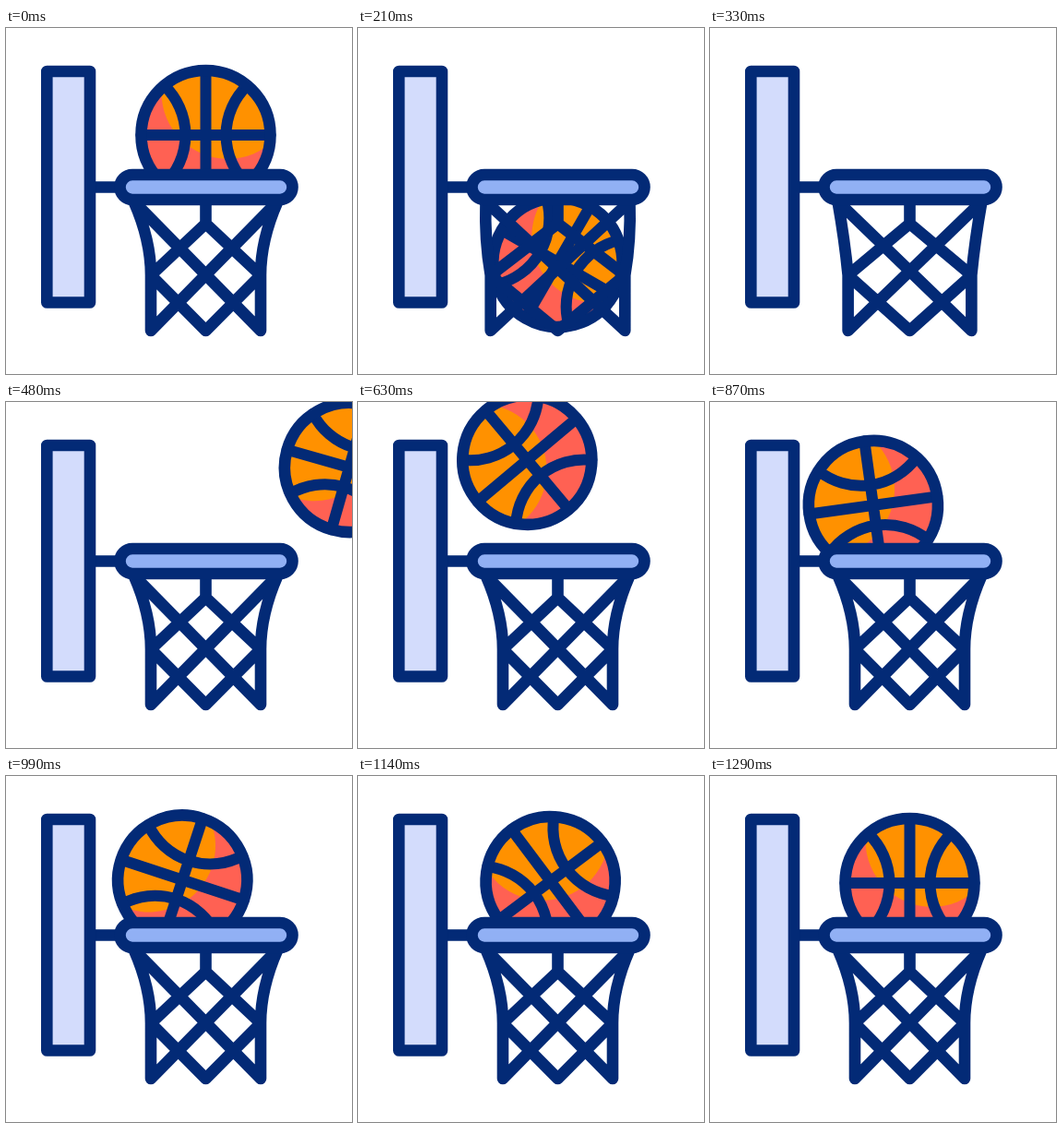
Recreate the animation shown at these times as an HTML page. Size 375 by 375 pixels, loop 1.5 s.

```html
<!DOCTYPE html>
<html lang="en">
<head>
<meta charset="utf-8">
<title>Basketball hoop</title>
<style>
  html, body { margin: 0; width: 100%; height: 100%; overflow: hidden; background: #fff; }
  svg { display: block; width: 100vw; height: 100vh; }
  .line { fill: none; stroke: #032a76; stroke-width: 12.6; stroke-linecap: round; stroke-linejoin: round; }
</style>
</head>
<body>
<svg viewBox="0 0 375 375">
  <defs><clipPath id="disc"><circle r="71"/></clipPath></defs>
  <g class="line">
    <path d="M95 172.500H122"/>
    <rect x="44.300" y="47" width="46.700" height="250.500" style="fill:#d3dcfc"/>
  </g>
  <g id="ball">
    <circle r="71" fill="#ff6153"/>
    <circle cx="24" cy="-46" r="72" fill="#ff9100" clip-path="url(#disc)"/>
    <g class="line">
      <path d="M0-70V70M-70 0H70M-45-53.600A74 74 0 0 1-45 53.600M45-53.600A74 74 0 0 0 45 53.600" stroke-width="12"/>
      <circle r="70"/>
    </g>
  </g>
  <path id="net" class="line"/>
  <rect class="line" x="123.500" y="159" width="187" height="27" rx="13.500" style="fill:#91b0f4"/>
</svg>
<script>
const LOOP = 1500, STEP = 30, CENTER = 216.5, WALL = 166;
const ball = document.getElementById('ball');
const net = document.getElementById('net');

// Progress from 0 to 1 between two times.
const progress = (t, from, to) => Math.min(1, Math.max(0, (t - from) / (to - from)));
const smooth = u => u * u * (3 - 2 * u);

// Drops through the hoop from rest.
function fall(t) {
  const drop = (Math.max(0, t - 75) / 135) ** 2;
  return { x: CENTER, y: 116 + 138 * drop, angle: 30 * drop };
}

// Flies in from the right, meets the board, then rolls to the middle of the rim.
function comeBack(t) {
  const flight = 206 * (Math.max(0, 654 - t) / 174) ** 1.25;
  const roll = progress(t, 690, 1290);
  return {
    x: WALL + flight + (CENTER - WALL) * smooth(roll),
    y: Math.min(57 + 0.00168 * (t - 571) ** 2, 111.5 + 4.5 * roll ** 2),
    angle: 0.373 * Math.max(0, 630 - t) - 130 * (1 - roll ** 1.16)
  };
}

function netPath(bulge) {
  const half = side => {
    const x = d => CENTER + side * d;
    const low = x(59.5 + bulge);
    return `M${x(78)} 188Q${x(59.5 + bulge * 1.5)} 230 ${low} 268V328L${x(-78)} 188`
      + `M${CENTER} 212L${low} 268L${CENTER} 328`;
  };
  return `M${CENTER} 188V212` + half(-1) + half(1);
}

function draw(now) {
  const t = Math.floor(now % LOOP / STEP) * STEP;
  const { x, y, angle } = t < 390 ? fall(t) : comeBack(t);
  ball.setAttribute('transform', `translate(${x} ${y}) rotate(${angle})`);
  net.setAttribute('d', netPath(17 * Math.sin(Math.PI * progress(t, 150, 360))));
}

const start = performance.now();
function tick() {
  draw(performance.now() - start);
  requestAnimationFrame(tick);
}
tick();
</script>
</body>
</html>
```
